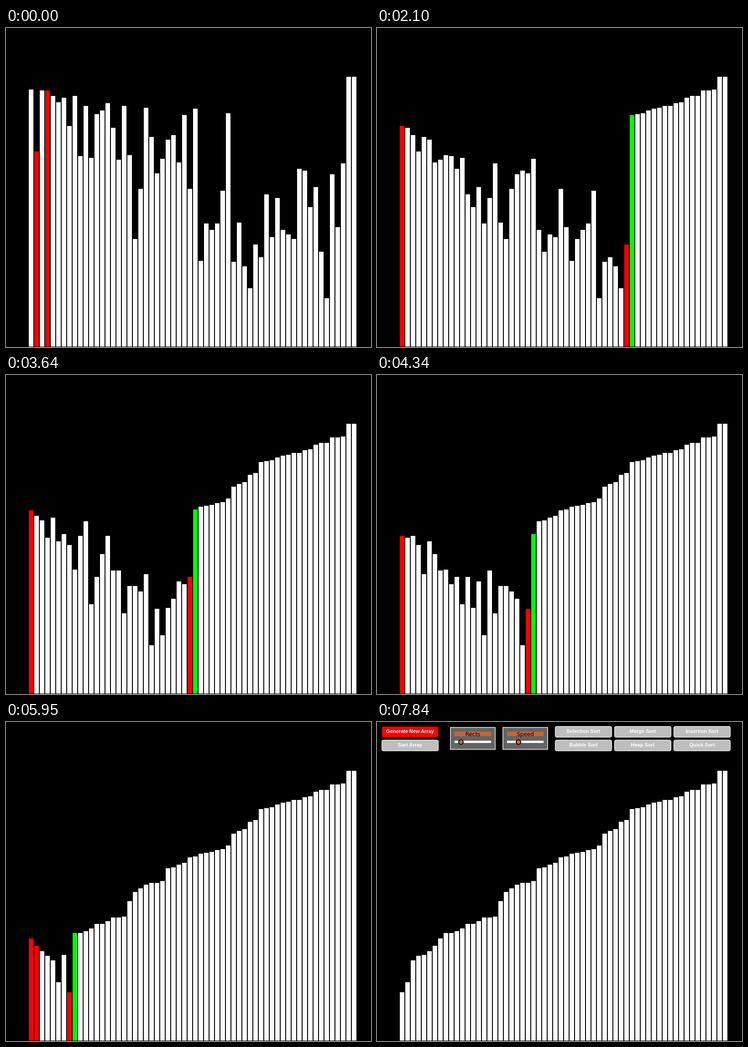
Animation, 800 px wide and 700 px high, one loop 8.47 s. Source, as an HTML page:

```html
<!DOCTYPE html>
<html lang="en">
<head>
<meta charset="utf-8">
<title>Heap sort</title>
<style>
  html, body { margin: 0; width: 100%; height: 100%; overflow: hidden; background: #000; }
  svg { display: block; width: 800px; height: 700px; }
  rect { shape-rendering: crispEdges; }
  .btn rect { fill: #bebebe; stroke: #fff; shape-rendering: auto; }
  .btn.hot rect { fill: #f00; stroke: #000; }
  .btn text { font: bold 11px "Liberation Sans", Arial, sans-serif; fill: #fff; text-anchor: middle; }
  .slider text { font: 12px "DejaVu Sans", Verdana, sans-serif; fill: #000; text-anchor: middle; }
</style>
</head>
<body>
<svg id="stage" viewBox="0 0 800 700">
  <g id="bars"></g>
  <g id="panel"></g>
</svg>
<script>
const FRAME = 70, LOOP = 8470, FLOOR = 699;
const EXTRACT = 1, SWAP = 1 / 6;   // relative time each kind of step stays visible

const start = [
  135, 271, 137, 137, 149, 163, 153, 215, 149, 281, 171, 285, 189, 181, 165,
  219, 289, 171, 279, 463, 353, 175, 239, 319, 287, 245, 235, 295, 191, 353,
  177, 511, 429, 443, 429, 357, 187, 513, 427, 523, 571, 475, 503, 365, 459,
  373, 443, 453, 463, 309, 313, 393, 349, 491, 593, 321, 437, 297, 107, 107
];

// A smaller top edge means a taller bar.
function record() {
  const tops = start.slice(), steps = [];
  let time = 0;

  function add(tag, cost, red, green) {
    steps.push({ tag, tops: tops.slice(), red, green, from: time, mid: time + cost / 2 });
    time += cost;
  }
  function swap(a, b) {
    [tops[a], tops[b]] = [tops[b], tops[a]];
  }
  function sift(size, i) {
    const parents = [];
    for (;;) {
      let big = i;
      for (const c of [2 * i + 1, 2 * i + 2])
        if (c < size && tops[c] < tops[big]) big = c;
      if (big === i) return parents;
      add(`s${size}.${parents.length}`, SWAP, [i, big], -1);
      swap(i, big);
      parents.push(i);
      i = big;
    }
  }

  let parents = sift(58, 1);
  for (let last = 57; last > 0; last--) {
    const red = [0, last];
    if (parents.length === 2) red.push(parents[1]);
    add("x" + last, EXTRACT, red, last + 1);
    swap(0, last);
    parents = sift(last, 0);
  }
  add("done", EXTRACT, [], -1);
  return steps;
}

const steps = record();

// Pace of the sort: tick number and the step reached by then
const pace = [
  [0, "s58.0"], [13, "x50"], [16, "x49"], [26, "s44.2"], [30, "x41"], [39, "s37.2"],
  [52, "x29"], [65, "x21"], [72, "s17.2"], [78, "x12"], [85, "x7"], [94, "done"]
].map(([tick, tag]) => [tick, steps.find(s => s.tag === tag).mid]);

function stepAt(tick) {
  const n = pace.findIndex(p => p[0] >= tick);
  if (n < 0) return steps[steps.length - 1];
  const [t1, c1] = pace[n], [t0, c0] = pace[Math.max(0, n - 1)];
  const c = t1 === tick ? c1 : c0 + (c1 - c0) * (tick - t0) / (t1 - t0);
  let found = steps[0];
  for (const s of steps) if (s.from <= c) found = s;
  return found;
}

const NS = "http://www.w3.org/2000/svg";
function el(parent, name, attrs, text) {
  const e = document.createElementNS(NS, name);
  for (const k in attrs) e.setAttribute(k, attrs[k]);
  if (text) e.textContent = text;
  parent.appendChild(e);
  return e;
}
function box(parent, x, y, width, height, fill) {
  return el(parent, "rect", { x, y, width, height, fill });
}

const barLayer = document.getElementById("bars");
const panel = document.getElementById("panel");
const bars = start.map((top, i) => box(barLayer, 50 + 12 * i, top, 10, FLOOR - top, "#fff"));

function button(x, y, label, hot) {
  const g = el(panel, "g", { class: hot ? "btn hot" : "btn" });
  el(g, "rect", { x: x + .5, y: y + .5, width: 124, height: 24, rx: 3.5 });
  el(g, "text", { x: x + 62.5, y: y + 15 }, label);
}
function slider(x, label, knob) {
  const g = el(panel, "g", { class: "slider" });
  box(g, x, 11, 100, 50, "#c8c8c8");
  box(g, x + 2, 13, 96, 46, "#646464");
  box(g, x + 10, 21, 80, 10, "#c86432");
  el(g, "text", { x: x + 50, y: 31 }, label);
  box(g, x + 10, 41, 80, 5, "#fff");
  el(g, "circle", { cx: knob, cy: 44, r: 6, fill: "#000" });
  el(g, "circle", { cx: knob, cy: 44, r: 4.2, fill: "#c86432" });
}

button(10, 9, "Generate New Array", true);
button(10, 39, "Sort Array");
slider(160, "Rects", 184);
slider(275, "Speed", 310);
[["Selection Sort", "Bubble Sort"], ["Merge Sort", "Heap Sort"], ["Insertion Sort", "Quick Sort"]]
  .forEach((pair, col) => pair.forEach((label, row) => button(390 + 130 * col, 9 + 30 * row, label)));

let shown = null;
function draw(now) {
  const step = stepAt(Math.floor(now % LOOP / FRAME));
  if (step !== shown) {
    shown = step;
    bars.forEach((bar, i) => {
      const top = step.tops[i];
      bar.setAttribute("y", top);
      bar.setAttribute("height", FLOOR - top);
      bar.setAttribute("fill", step.red.includes(i) ? "#f00" : i === step.green ? "#0f0" : "#fff");
    });
    panel.setAttribute("visibility", step.tag === "done" ? "visible" : "hidden");
  }
}

const begin = performance.now();
function tick() {
  draw(performance.now() - begin);
  requestAnimationFrame(tick);
}
tick();
</script>
</body>
</html>
```
